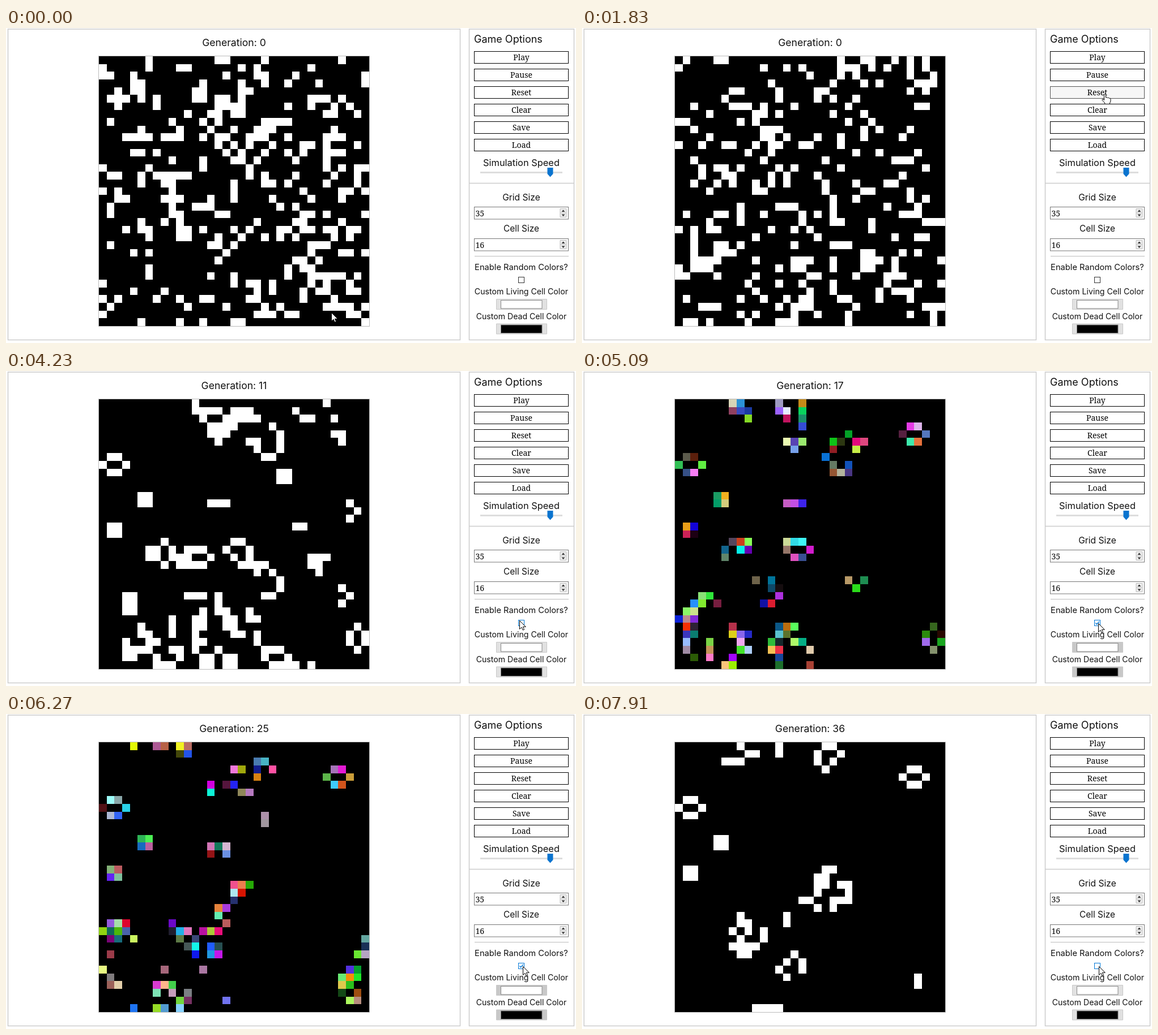
An HTML page with a canvas that plays this animation: 1006 by 557 pixels, repeating every 8000 ms.

```html
<!DOCTYPE html>
<html lang="en">
<head>
<meta charset="utf-8">
<title>Game of Life</title>
<style>
  html, body { margin: 0; width: 100%; height: 100%; overflow: hidden; background: #fff; }
  canvas { position: absolute; left: 164px; top: 50px; width: 477px; height: 477px; image-rendering: pixelated; }
  svg { position: absolute; left: 0; top: 0; }
  text { font-family: Inter, sans-serif; fill: #111; text-anchor: middle; }
  .slab { font: 14px "Noto Serif", serif; fill: #000; }
  .left { text-anchor: start; }
  .panel { fill: none; stroke: #ccc; stroke-width: 1.5; }
  .field { fill: #fff; stroke: #777; }
  .button rect { fill: #fff; stroke: #000; }
  .button.hover rect { fill: #f6f6f6; stroke: #555; }
  #check path { fill: none; stroke: #0078d7; stroke-width: 1.4; }
  .cursor { fill: #fff; stroke: #000; stroke-linejoin: round; }
</style>
</head>
<body>
<canvas id="board" width="35" height="35"></canvas>
<svg width="1006" height="557" viewBox="0 0 1006 557">
  <rect class="panel" x="3.5" y="2" width="798" height="549.5"/>
  <rect class="panel" x="817.5" y="2" width="185" height="549.5"/>
  <path class="panel" d="M818 274.5H1002"/>
  <path d="M827 403.5H993" stroke="#bbb"/>
  <rect x="163.5" y="49.5" width="478" height="478" fill="none" stroke="#bbb"/>
  <text id="title" x="402.5" y="32" font-size="17.6"></text>
  <text class="left" x="826" y="26" font-size="18">Game Options</text>
  <g id="buttons"></g>

  <text x="909.5" y="244" font-size="16.4">Simulation Speed</text>
  <rect x="837" y="254" width="145" height="3" fill="#ddd"/>
  <path d="M955.5 247h10v11l-5 5.5l-5-5.5z" fill="#0a74cf"/>

  <text x="909.5" y="305" font-size="15.6">Grid Size</text>
  <text x="909.5" y="360" font-size="15.4">Cell Size</text>
  <g id="fields"></g>

  <text x="909.5" y="427.5" font-size="14.7">Enable Random Colors?</text>
  <g id="check">
    <rect x="904.5" y="440.5" width="10" height="10" fill="#fff" stroke="#333"/>
    <path d="M906.5 445.5l2.2 2.5l4-5"/>
  </g>
  <text x="909.5" y="471" font-size="14.2">Custom Living Cell Color</text>
  <text x="909.5" y="514.5" font-size="14.1">Custom Dead Cell Color</text>
  <g id="swatches">
    <path d="M865.5 479.5h89v18h-89zM865.5 523h89v18h-89z" stroke="#c8c8c8"/>
    <rect x="873.5" y="481.5" width="72.5" height="14.5" fill="#fff" stroke="#888"/>
    <rect x="873.5" y="525" width="72.5" height="14.5" fill="#000" stroke="#888"/>
  </g>

  <path id="arrow" class="cursor" d="M.5 .5V15.5L4 12.2L6.3 17.2L8.6 16.2L6.4 11.3H11.3Z"/>
  <path id="hand" class="cursor" d="M-1.5 1.5q1.5-2 3 0V7q2-1 3 .5q2-1 3 .8q2-.8 2.5 1V13L8 18.5H.5Q-1 15-5 11.5q0-2.500 2-1.500l1.5 1.5Z"/>
</svg>
<script>
const N = 35, LOOP = 8000, TICK = 108.3, LAST_TICK = 73;
const $ = id => document.getElementById(id);
const ctx = $("board").getContext("2d");

$("buttons").innerHTML = ["Play", "Pause", "Reset", "Clear", "Save", "Load"].map((name, i) =>
  `<g class="button" transform="translate(826.5 ${41.5 + 31 * i})">
    <rect width="166" height="21"/><text class="slab" x="83" y="15.5">${name}</text></g>`).join("");

$("fields").innerHTML = [[316.5, 35], [372.5, 16]].map(([y, value]) =>
  `<g transform="translate(826.5 ${y})">
    <rect class="field" width="166" height="21.5"/>
    <text class="slab left" x="2" y="16.5">${value}</text>
    <path d="M151.5 3h11v15h-11zm0 7.5h11" fill="#eee" stroke="#bbb"/>
    <path d="M154 8.5l3-3.5l3 3.5zM154 13l3 3.5l3-3.5z" fill="#333"/></g>`).join("");

function random(seed) {
  return () => {
    seed = seed + 0x6D2B79F5 | 0;
    let v = Math.imul(seed ^ seed >>> 15, 1 | seed);
    v = v + Math.imul(v ^ v >>> 7, 61 | v) ^ v;
    return ((v ^ v >>> 14) >>> 0) / 2 ** 32;
  };
}

function soup(seed) {
  const rnd = random(seed);
  return Array.from({ length: N * N }, () => rnd() < 0.23);
}

// One generation on a board whose edges wrap around.
function evolve(cells) {
  return cells.map((alive, i) => {
    const x = i % N, y = (i - x) / N;
    let count = alive ? -1 : 0;
    for (let dy = -1; dy < 2; dy++)
      for (let dx = -1; dx < 2; dx++)
        count += cells[(y + dy + N) % N * N + (x + dx + N) % N];
    return count === 3 || alive && count === 2;
  });
}

const resets = [8, 13, 15, 17];
const soups = [11, 23, 37, 58, 71].map(soup);
const history = [soups[resets.length]];
while (history.length < 37) history.push(evolve(history[history.length - 1]));

// The simulation skips a screen tick every 3.72 ticks.
function generationAt(tick) {
  return tick < 25 ? 0 : tick - 25 - Math.floor((tick - 26.9) / 3.72);
}

// Pointer stops: tick, x, y
const stops = [[0, 574, 503], [5, 922, 116], [17, 923, 116], [20, 899, 55], [31, 899, 55],
  [39, 906, 441], [41, 911, 446], [51, 911, 446], [58, 912, 446], [LAST_TICK, 912, 446]];

function pointerAt(tick) {
  const i = Math.max(1, stops.findIndex(s => s[0] >= tick));
  const [t0, x0, y0] = stops[i - 1], [t1, x1, y1] = stops[i];
  const p = (tick - t0) / (t1 - t0), e = p * p * (3 - 2 * p);
  return [Math.round(x0 + (x1 - x0) * e), Math.round(y0 + (y1 - y0) * e)];
}

function drawBoard(cells, generation, colored) {
  const rnd = random(generation + 500);
  ctx.fillStyle = "#000";
  ctx.fillRect(0, 0, N, N);
  cells.forEach((alive, i) => {
    if (!alive) return;
    ctx.fillStyle = colored ? `rgb(${[0, 0, 0].map(() => Math.floor(rnd() * 256))})` : "#fff";
    ctx.fillRect(i % N, Math.floor(i / N), 1, 1);
  });
}

function drawPointer(x, y) {
  let overButton = false;
  [...$("buttons").children].forEach((button, i) => {
    const top = 41 + 31 * i, hover = x > 826 && x < 994 && y >= top && y <= top + 22;
    button.classList.toggle("hover", hover);
    overButton = overButton || hover;
  });
  for (const [id, shown] of [["arrow", !overButton], ["hand", overButton]]) {
    $(id).setAttribute("transform", `translate(${x} ${y})`);
    $(id).style.display = shown ? "" : "none";
  }
  const overCheck = x >= 904 && x <= 915 && y >= 440 && y <= 451;
  $("check").firstElementChild.setAttribute("stroke", overCheck ? "#0078d7" : "#333");
}

let shownTick = -1;
function frame() {
  const time = performance.now() % LOOP;
  const tick = Math.min(LAST_TICK, Math.floor((time + 20) / TICK));
  if (tick !== shownTick) {
    shownTick = tick;
    const generation = generationAt(tick), colored = tick >= 41 && tick < 70;
    const round = resets.filter(t => t <= tick).length;
    drawBoard(round < resets.length ? soups[round] : history[generation], generation, colored);
    $("title").textContent = "Generation: " + generation;
    $("check").lastElementChild.style.display = colored ? "" : "none";
    $("swatches").setAttribute("fill", colored ? "#c8c8c8" : "#e1e1e1");
    drawPointer(...pointerAt(tick));
  }
  requestAnimationFrame(frame);
}
frame();
</script>
</body>
</html>
```
